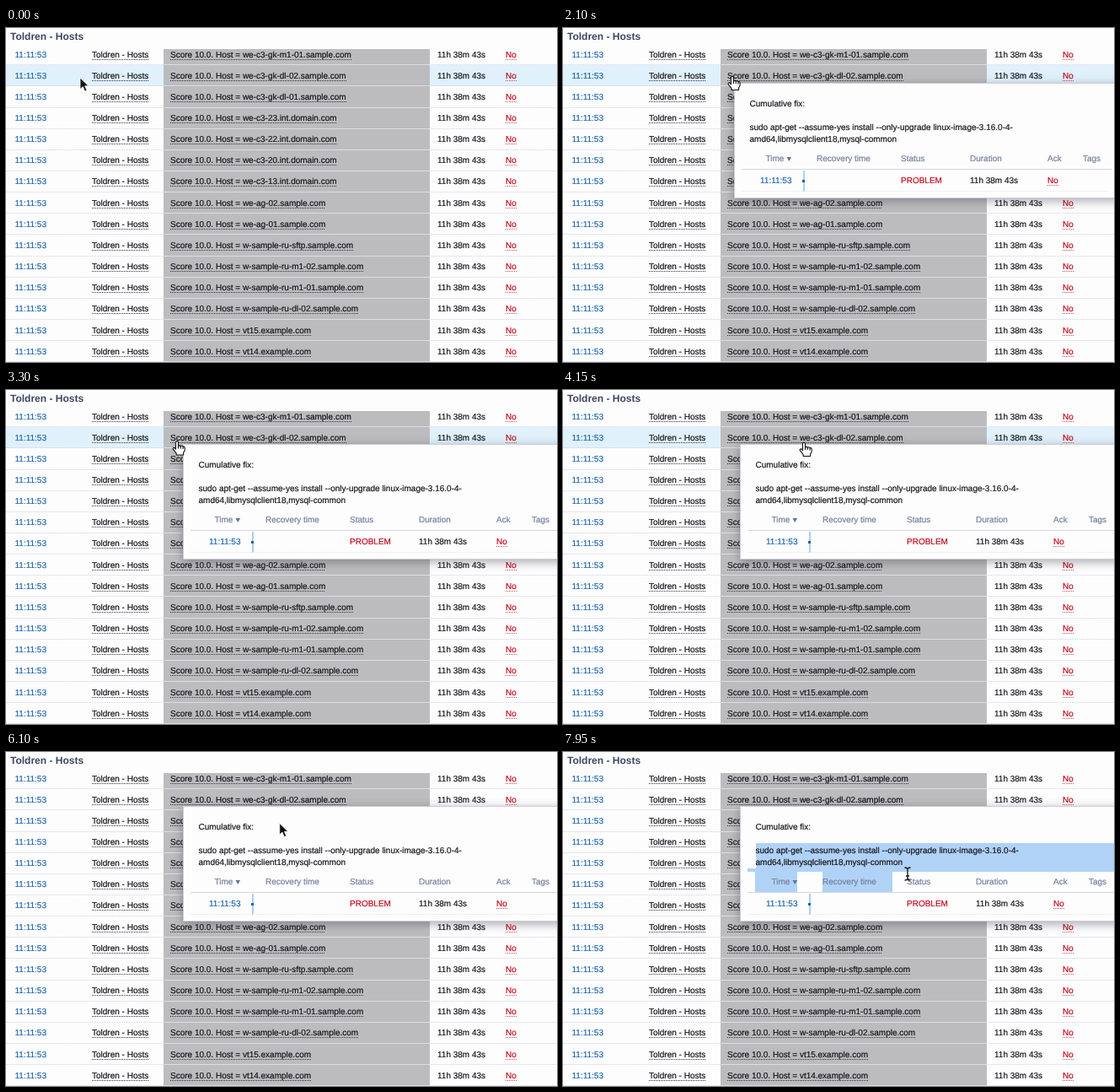
An HTML page for the animation above (8000 ms loop, 654 px wide and 396 px high).

```html
<!DOCTYPE html>
<html lang="en">
<head>
<meta charset="utf-8">
<title>Problem list</title>
<style>
  html, body { margin: 0; width: 100%; height: 100%; overflow: hidden; background: #fdfdfe; }
  svg { display: block; width: 654px; height: 396px; }
  text { font: 10px "Liberation Sans", Arial, sans-serif; fill: #17171c; stroke: #17171c; stroke-width: .2px; text-rendering: geometricPrecision; white-space: pre; }
  .title { font-size: 12px; font-weight: bold; fill: #3c4660; stroke: none; }
  .time { fill: #1c64ae; stroke: #1c64ae; }
  .red { fill: #c40a18; stroke: #c40a18; }
  .head { fill: #75809a; stroke: #75809a; }
  .panel { filter: drop-shadow(0 3px 6px rgba(40, 40, 60, .4)); }
</style>
</head>
<body>
<svg id="stage" viewBox="0 0 654 396"></svg>
<script>
const LOOP = 8000, POPUP_AT = 1850, PIN_AT = 2600, DRAG_AT = 7400;
const stage = document.getElementById('stage');

function add(parent, tag, attrs = {}, content) {
  const el = document.createElementNS('http://www.w3.org/2000/svg', tag);
  for (const key in attrs) el.setAttribute(key, attrs[key]);
  if (content) el.textContent = content;
  parent.append(el);
  return el;
}
const rect = (parent, x, y, width, height, fill) =>
  add(parent, 'rect', { x, y, width, height, fill });
const label = (parent, x, y, content, cls = '') =>
  add(parent, 'text', { x, y, class: cls }, content);
const dots = (parent, x1, x2, y, stroke) =>
  add(parent, 'path', { d: `M${x1} ${y + .5}H${x2}`, stroke, 'stroke-dasharray': '1 1' });
function link(parent, x, y, content, cls) {
  const el = label(parent, x, y, content, cls);
  const end = Math.round(x + el.getComputedTextLength());
  dots(parent, x, end, y + 2, cls === 'red' ? '#cf4a55' : '#33333c');
}

// Table of problems
const hosts = [
  'we-c3-gk-m1-01.sample.com', 'we-c3-gk-dl-02.sample.com', 'we-c3-gk-dl-01.sample.com',
  'we-c3-23.int.domain.com', 'we-c3-22.int.domain.com', 'we-c3-20.int.domain.com',
  'we-c3-13.int.domain.com', 'we-ag-02.sample.com', 'we-ag-01.sample.com',
  'w-sample-ru-sftp.sample.com', 'w-sample-ru-m1-02.sample.com', 'w-sample-ru-m1-01.sample.com',
  'w-sample-ru-dl-02.sample.com', 'vt15.example.com', 'vt14.example.com'
];
const rowHover = rect(stage, 0, 44, 654, 25, '#e0f1fc');
rect(stage, 187, 25, 316, 371, '#bcbcbe');
label(stage, 5, 14, 'Toldren - Hosts', 'title');
hosts.forEach((host, i) => {
  const middle = 31 + 25.15 * i, base = Math.round(middle + 3.6);
  const line = Math.round(middle + 12.2);
  dots(stage, 0, 654, line, '#cfcfe2');
  rect(stage, 187, line, 316, 1, '#dcdce6');
  label(stage, 10.5, base, '11:11:53', 'time');
  link(stage, 102, base, 'Toldren - Hosts');
  link(stage, 195, base, 'Score 10.0. Host = ' + host);
  label(stage, 512, base, '11h 38m 43s');
  link(stage, 593, base, 'No', 'red');
});

// Hint window
const popup = add(stage, 'g');
add(popup, 'rect', { x: 210.5, y: 64.5, width: 480, height: 136, fill: '#fdfdfe', stroke: '#cdcdd6', class: 'panel' });
const selection = add(popup, 'path', { fill: '#b0d2f6' });
label(popup, 228.5, 91.5, 'Cumulative fix:');
label(popup, 228.5, 119.7, 'sudo apt-get --assume-yes install --only-upgrade linux-image-3.16.0-4-');
label(popup, 228.5, 133.7, 'amd64,libmysqlclient18,mysql-common');
[[247.5, 'Time'], [308, 'Recovery time'], [408, 'Status'], [490, 'Duration'], [582, 'Ack'], [624, 'Tags']]
  .forEach(([x, name]) => label(popup, x, 157, name, 'head'));
add(popup, 'path', { d: 'M272.5 152h5.5l-2.75 5z', fill: '#5f7396' });
rect(popup, 219, 166, 440, 1, '#d3d6e2');
rect(popup, 292, 168, 2, 25, '#abd0ee');
rect(popup, 291, 179, 3, 3, '#1c64ae');
dots(popup, 219, 654, 192, '#e4e4ee');
label(popup, 241, 183, '11:11:53', 'time');
label(popup, 408, 183, 'PROBLEM', 'red');
label(popup, 490, 183, '11h 38m 43s');
link(popup, 582, 183, 'No', 'red');

// Pointers, each with its hot spot at 0,0
const pointers = {
  arrow: add(stage, 'path', {
    d: 'M0 0V13.5L3.2 10.6 5.5 16 8 15 5.7 9.8H10Z', fill: '#111', stroke: '#fff', 'stroke-width': .8
  }),
  hand: add(stage, 'path', {
    d: 'M-1.5 1.2Q0-.8 1.5 1.2V6Q3 4.6 4.3 6.2Q6 5 7 6.8Q9 6 9.2 8.3V11L7.6 14V16.5H-.8V14.6L-4.8 9.7Q-5.2 7.4-3 8L-1.5 9.6ZM1.5 6V9M4.3 6.5V9M7 7V9.5',
    fill: '#fff', stroke: '#111', 'stroke-width': 1.1, 'stroke-linejoin': 'round'
  }),
  beam: add(stage, 'path', {
    d: 'M-3.5-7.5Q0-7.5 0-5V5Q0 7.5-3.5 7.5M3.5-7.5Q0-7.5 0-5V5Q0 7.5 3.5 7.5M-2 2.5H2',
    fill: 'none', stroke: '#111', 'stroke-width': 1.3
  })
};

// time, x, y, pointer from that time on
const path = [
  [0, 88, 59, 'arrow'], [900, 88, 59, 'arrow'], [1850, 200, 57, 'hand'], [2150, 201, 57, 'hand'],
  [2600, 203, 60.5, 'hand'], [3450, 203, 60.5, 'hand'], [3620, 225, 68, 'arrow'], [3850, 262, 68, 'hand'],
  [4050, 286, 62, 'hand'], [4300, 286, 62, 'hand'], [5150, 387, 60.5, 'hand'], [5400, 387, 60.5, 'hand'],
  [5750, 360, 75, 'arrow'], [6400, 297, 92, 'arrow'], [7050, 297, 92, 'arrow'],
  [7320, 229, 116, 'beam'], [DRAG_AT, 229, 116, 'beam'], [7900, 409, 144.5, 'beam'], [LOOP, 409, 144.5, 'beam']
];

function pointerAt(t) {
  const i = path.findIndex(key => key[0] > t);
  const [t0, x0, y0, kind] = path[i - 1], [t1, x1, y1] = path[i];
  const p = (t - t0) / (t1 - t0), ease = p * p * (3 - 2 * p);
  return { x: x0 + (x1 - x0) * ease, y: y0 + (y1 - y0) * ease, kind };
}

function selectionTo(x, y) {
  const right = Math.max(229, x);
  if (y < 124) return `M229 108H${right}V124H229Z`;
  if (y < 138) return `M229 108H654V124H${right}V138H229Z`;
  return 'M229 108H654V142H219V138H229ZM228 142H278V166H228ZM308 142H391V166H308Z';
}

const show = (el, on) => el.setAttribute('visibility', on ? 'visible' : 'hidden');

function draw(now) {
  const t = now % LOOP, { x, y, kind } = pointerAt(t);
  for (const name in pointers) show(pointers[name], name === kind);
  pointers[kind].setAttribute('transform', `translate(${x} ${y})`);
  show(rowHover, y < 65);
  show(popup, t >= POPUP_AT);
  popup.setAttribute('transform', t < PIN_AT ? 'translate(-7 1)' : '');
  selection.setAttribute('d', t >= DRAG_AT ? selectionTo(x, y) : '');
}

const start = performance.now();
function tick() {
  draw(performance.now() - start);
  requestAnimationFrame(tick);
}
draw(0);
requestAnimationFrame(tick);
</script>
</body>
</html>
```
